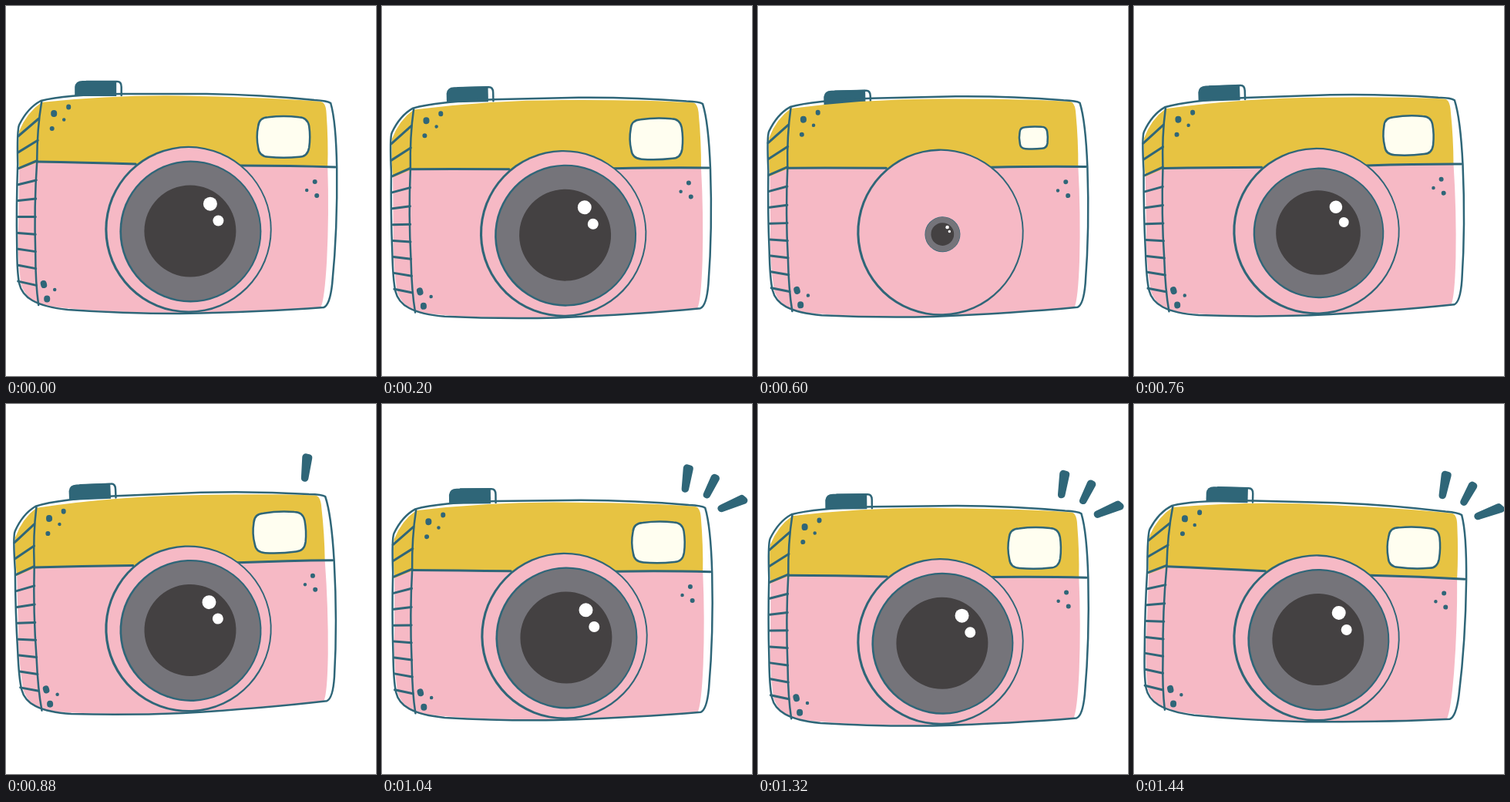
An HTML page that plays this animation: 480 px wide and 480 px high, repeating every 1480 ms.

```html
<!DOCTYPE html>
<html lang="en">
<head>
<meta charset="utf-8">
<title>Camera</title>
<style>
  html, body { margin: 0; width: 100%; height: 100%; overflow: hidden; background: #fff; }
  svg { display: block; width: 100%; height: 100%; }
  .ink { fill: #2f6678; }
  .line, .dots { fill: none; stroke: #2f6678; stroke-width: 2.5; stroke-linecap: round; stroke-linejoin: round; }
  .bold { stroke-width: 3; }
  .ray { fill: #2f6678; stroke: #2f6678; stroke-width: 9.5; stroke-linejoin: round; }
  .pink { fill: #f6b9c5; }
  .yellow { fill: #e7c342; }
  #flash { fill: #fffef0; vector-effect: non-scaling-stroke; }
</style>
</head>
<body>
<svg viewBox="0 0 480 480">
  <g id="camera">
    <g id="button">
      <path class="ink" d="M89 117V105Q90 97 99 97H143V117Z"/>
      <path class="line" d="M104 98H144Q149.500 98 149.500 105V116"/>
    </g>

    <path class="pink" d="M17 211L40 202L417 208Q419 270 416 330Q413 382 408 391Q330 396 225 398Q110 398 45 388Q25 380 19 360Q14 320 16 280Z"/>
    <path class="yellow" d="M46 125Q150 114 250 117Q350 119 408 124Q415 125 415.500 140Q418 175 417 209L40 203L17 212Q15 185 17 162Q27 138 46 125Z"/>

    <path class="line" d="M45 123Q28 132 17 154Q14 160 15 205Q13 260 14 310Q14 345 17 360Q20 374 34 382Q50 391 80 394Q150 399 225 399Q330 397 412 391Q420 388 423 360Q430 290 429 210Q428 150 421 126Q417 123 400 122Q330 115 260 114H150Q75 115 45 123Z"/>
    <path class="line" d="M46 124Q40 160 40 202Q36 260 38 320Q38 360 42 388"/>
    <path class="line bold" d="M40 202Q100 203 168 205M304 207Q370 207 427 209"/>
    <path class="line bold" id="grip"/>

    <path class="dots" style="stroke-width:8" d="M62 139v1M48.500 360l.5 2M53 379.500v1"/>
    <path class="dots" style="stroke-width:6" d="M81 130.500v1M59.500 159h0M400.500 228h0M403 246h0"/>
    <path class="dots" style="stroke-width:4.500" d="M75 147.500h0M63 368h0M390 239h0"/>

    <circle class="ink" cx="236.300" cy="290" r="108.200"/>
    <circle class="pink" cx="236.900" cy="289.800" r="105.700"/>

    <g id="lens">
      <circle class="ink" r="92"/>
      <circle fill="#75747a" cx=".3" cy="-.1" r="89.700"/>
      <circle fill="#444142" cx="-.5" cy="-.5" r="59.500"/>
      <circle fill="#fff" cx="25.500" cy="-35.800" r="9"/>
      <circle fill="#fff" cx="36" cy="-14" r="7"/>
    </g>

    <path id="flash" class="line" d="M-33-14Q-32-25-20-25.500Q0-28 20-25.500Q31-25 33-14Q35 0 33 14Q31 26 20 26Q0 28-20 26Q-32 25-33 14Q-36 0-33-14Z"/>

    <path class="ray" d="M398 74L401.500 75L395.500 101Z"/>
    <path class="ray" d="M433.500 87L435.500 88L423.500 109Z"/>
    <path class="ray" d="M468.500 114.500L471.500 117L442 127Z"/>
  </g>
</svg>
<script>
const LOOP = 1480, STEP = 40;
const $ = id => document.getElementById(id);
const place = (id, transform) => $(id).setAttribute("transform", transform);
const rays = document.querySelectorAll(".ray");

// Grip lines: evenly spaced, flattening towards the bottom
let grip = "";
for (let i = 0; i < 10; i++) {
  const right = 38 + (i - 6) ** 2 * .12, tilt = 8 - 31 * Math.exp(-i / 3.7);
  grip += `M15.500 ${169 + 20.9 * i}L${right} ${169 + 20.9 * i + tilt}`;
}
$("grip").setAttribute("d", grip);

// Smooth step from 0 to 1, and a rise and fall built from two of them
function ramp(t, from, to) {
  const u = Math.min(1, Math.max(0, (t - from) / (to - from)));
  return u * u * (3 - 2 * u);
}
const bump = (t, from, peak, to) => ramp(t, from, peak) * (1 - ramp(t, peak, to));

function draw(now) {
  const t = Math.floor(now % LOOP / STEP) * STEP;

  const lift = ramp(t, 840, 1160), settle = ramp(t, 1160, 1440);
  const jolt = bump(t, 1160, 1300, 1440);
  const x = 236.7 - 1.7 * bump(t, 0, 280, 560);
  const y = 290 + 6 * bump(t, 0, 260, 1080) + 16 * lift - 2.5 * settle + 4 * jolt;
  const angle = -1.3 * ramp(t, 0, 200) + .6 * bump(t, 200, 360, 640)
    - 1.1 * ramp(t, 640, 880) + 2.8 * ramp(t, 880, 1160) + settle - 1.7 * jolt;
  place("camera", `translate(${x} ${y}) rotate(${angle}) translate(-236.5 -290)`);

  const shutter = bump(t, 400, 600, 800);
  place("button", `translate(0 ${6 * ramp(t, 240, 340) * (1 - ramp(t, 620, 760))})`);
  place("lens", `translate(239.2 292.5) scale(${1 - .75 * shutter})`);
  place("flash", `translate(360 169.8) scale(${1 - .46 * shutter})`);
  rays.forEach((ray, i) => ray.style.display = t < 840 + 80 * i ? "none" : "");
}

const start = performance.now();
(function tick() {
  draw(performance.now() - start);
  requestAnimationFrame(tick);
})();
</script>
</body>
</html>
```
